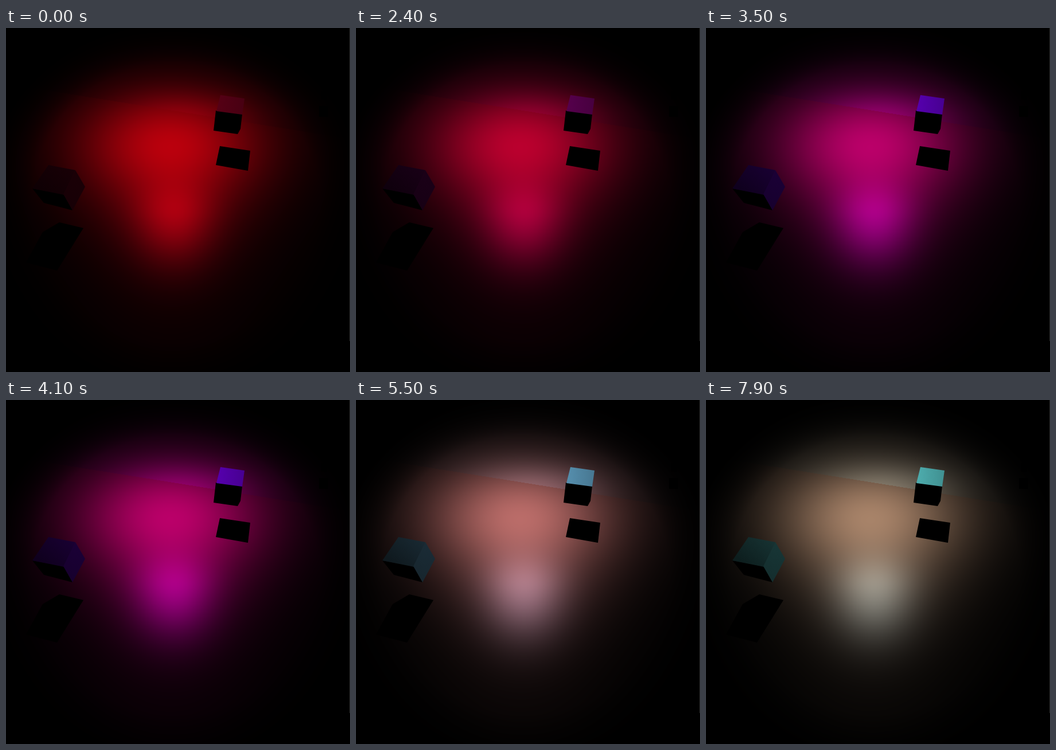
These frames come from a looping animation (600 px wide and 600 px high, 8 s). An HTML page with a canvas:

```html
<!DOCTYPE html>
<html lang="en">
<head>
<meta charset="utf-8">
<title>Coloured spotlight</title>
<style>
html, body { margin: 0; height: 100%; overflow: hidden; background: #000; }
canvas { display: block; width: 600px; height: 600px; }
</style>
</head>
<body>
<canvas id="stage" width="600" height="600"></canvas>
<script>
const SIZE = 600, LOOP = 8000, STEP = 100;
const ctx = document.getElementById('stage').getContext('2d');
const image = ctx.createImageData(SIZE, SIZE);
const FLOOR = [185, 130, 105], WALL = [157, 124, 105], CUBE = [87, 175, 178];

const clamp = v => Math.max(0, Math.min(1, v));
const ramp = (t, from, to) => clamp((t - from) / (to - from));
const bell = (d, s) => Math.exp(-d * d / (2 * s * s));
const isWall = (x, y) => y < 97 + .16 * x;

// Red, green and blue of the lamp: blue comes up, then green, then red dips
const lampAt = t => [
  1 - .1 * ramp(t, 7700, 7900),
  1 - (1 - ramp(t, 4800, 6000)) ** 2,
  .12 + .87 * ramp(t, 1800, 2800) ** 2
];

// Matt light on floor and wall
function diffuse(x, y) {
  const dy = y - 205;
  const fall = dy < 0 ? bell(dy, 75) : (1 + (dy / 140) ** 2) ** -1.5;
  const rim = clamp(4 * (1 - Math.hypot((x - 295) / 335, (y - 305) / 325)));
  return bell(x - 286, 118) * fall * rim;
}

// Glossy reflection on the floor, fainter along the foot of the wall
function gloss(x, y) {
  if (isWall(x, y)) return 26 * bell(x - 315, 75) * bell(y - 150, 26);
  const dy = y - 330;
  return 90 * bell(x - 293, 50) * bell(dy, dy < 0 ? 40 : 60);
}

const matt = new Float32Array(SIZE * SIZE), shine = new Float32Array(SIZE * SIZE);
for (let i = 0; i < matt.length; i++) {
  const x = i % SIZE, y = Math.floor(i / SIZE);
  matt[i] = diffuse(x, y);
  shine[i] = gloss(x, y);
}

function shape(fill, path) {
  ctx.fillStyle = fill;
  ctx.fill(new Path2D(path));
}

// Cube colour under the lamp, fading from one point to another
function shade(lamp, x0, y0, x1, y1, from, to) {
  const g = ctx.createLinearGradient(x0, y0, x1, y1);
  [from, to].forEach((k, i) =>
    g.addColorStop(i, `rgb(${CUBE.map((c, j) => Math.round(c * lamp[j] * k))})`));
  return g;
}

function draw(lamp) {
  const px = image.data;
  for (let i = 0; i < matt.length; i++) {
    const base = isWall(i % SIZE, Math.floor(i / SIZE)) ? WALL : FLOOR;
    for (let c = 0; c < 3; c++)
      px[4 * i + c] = lamp[c] * (base[c] * matt[i] + shine[i]);
    px[4 * i + 3] = 255;
  }
  ctx.putImageData(image, 0, 0);

  // Far cube and its shadow
  shape('#000', 'M373 206L426 214L422 249L366 239Z');
  shape('#000', 'M366 144L412 150L409 176L404 185L362 179Z');
  shape(shade(lamp, 367, 0, 416, 0, .99, .82), 'M374 117L416 123L412 151L367 145Z');

  // Near cube and its shadow
  shape('#000', 'M93 339L135 349L89 423L35 409L64 356Z');
  shape('#000', 'M46 280L101 290L116 318L66 305Z');
  shape(shade(lamp, 105, 240, 65, 285, .28, .17), 'M74 239L121 248L101 291L46 280Z');
  shape(shade(lamp, 130, 260, 108, 310, .3, .26), 'M121 248L138 277L116 318L100 290Z');

  // Distant dark figure and the right edge
  shape('#000', 'M549 110h11v15h-11ZM546 136h16v19h-16Z');
  shape('#2a2a2a', 'M599 0h1v546h-1Z');
}

let shown = -1;
function tick() {
  const t = Math.floor(performance.now() % LOOP / STEP) * STEP;
  if (t !== shown) draw(lampAt(shown = t));
  requestAnimationFrame(tick);
}
tick();
</script>
</body>
</html>
```
